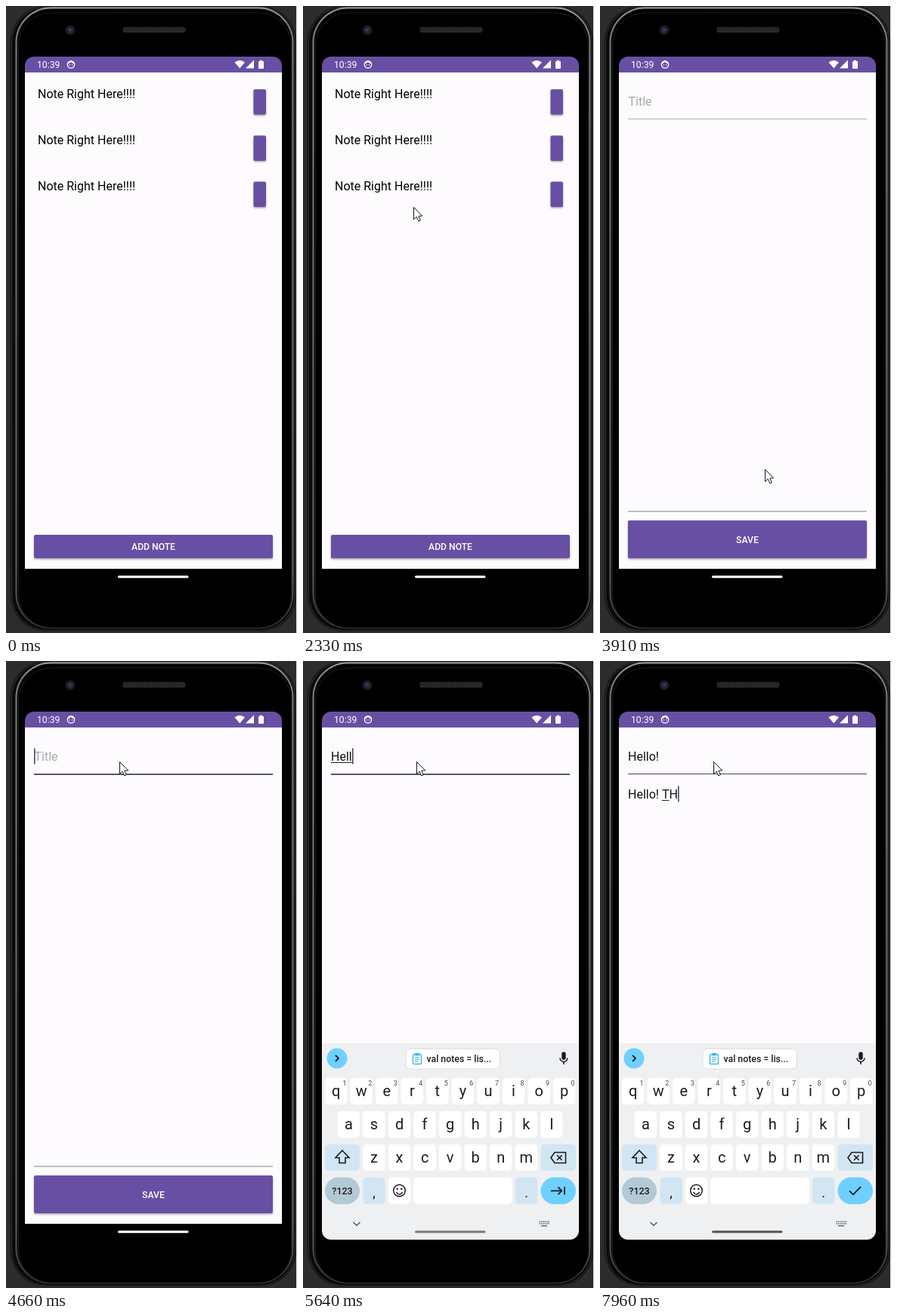
An HTML page with a canvas that plays this animation: 385x830 px, repeating every 8000 ms.

```html
<!DOCTYPE html>
<html lang="en">
<head>
<meta charset="utf-8">
<title>Note app</title>
<style>
html, body { margin: 0; width: 100%; height: 100%; overflow: hidden; background: #2c2c2f; }
canvas { display: block; }
</style>
</head>
<body>
<canvas id="stage" width="385" height="830"></canvas>
<script>
const c = document.getElementById('stage').getContext('2d');
const LOOP = 8000, STEP = 120;
const LIST_PRESS = 3540, EDIT = 3660, FOCUS = 4660, KEYS = 4780, NEXT_FIELD = 6120;
const PURPLE = '#6750a3', PAPER = '#fefbfe', INK = '#1b1c1f', SKY = '#6fd0ff', PALE = '#d2e5f3', BLUE = '#42b6e6';
const FONT = 'Roboto, sans-serif';
const BODY = '16px ' + FONT;

// Pointer legs: arrival time, number of steps, destination, sideways bend.
const LEGS = [
  [860, 4, 125, 258], [1010, 1, 136, 259], [1430, 2, 131, 146], [1690, 2, 135, 115],
  [2070, 2, 140, 151], [2450, 3, 149, 323], [3100, 4, 182, 639],
  [3250, 1, 204, 698], [3400, 1, 207, 709], [4510, 6, 150, 133, 40]
];

function pointerAt(t) {
  let x = -15, y = 351;
  for (const [end, steps, toX, toY, bend = 0] of LEGS) {
    const done = Math.floor((t - end) / STEP) + steps;
    if (done <= 0) break;
    const p = Math.min(1, done / steps);
    x += (toX - x) * p + bend * Math.sin(Math.PI * p);
    y += (toY - y) * p;
    if (p < 1) break;
  }
  return [Math.round(x), Math.round(y)];
}

const typed = (s, start, pace, t) => s.slice(0, Math.max(0, Math.floor((t - start) / pace) + 1));
const keyboardOffset = t => Math.round(70 * 0.057 ** Math.floor((t - KEYS) / STEP));
const handleShade = t => Math.round(95 + 160 * Math.exp(-Math.max(0, t - 4900) / 500));

function box(x, y, w, h, r, fill) {
  c.beginPath();
  c.roundRect(x, y, w, h, r);
  if (fill) { c.fillStyle = fill; c.fill(); }
}

function stroke(color, width) {
  c.strokeStyle = color;
  c.lineWidth = width;
  c.stroke();
}

function outline(x, y, w, h, r, color, width) {
  box(x, y, w, h, r);
  stroke(color, width);
}

function rect(x, y, w, h, fill) {
  c.fillStyle = fill;
  c.fillRect(x, y, w, h);
}

function text(s, x, y, font, fill, align = 'left') {
  c.font = font;
  c.fillStyle = fill;
  c.textAlign = align;
  c.fillText(s, x, y);
}

function path(points, close) {
  c.beginPath();
  points.forEach(([x, y]) => c.lineTo(x, y));
  if (close) c.closePath();
}

function line(points, color, width, close) {
  path(points, close);
  stroke(color, width);
}

function shape(points, fill) {
  path(points, true);
  c.fillStyle = fill;
  c.fill();
}

function disc(x, y, r, fill) {
  c.beginPath();
  c.arc(x, y, r, 0, 7);
  c.fillStyle = fill;
  c.fill();
}

function arc(x, y, r, from, to, color, width) {
  c.beginPath();
  c.arc(x, y, r, from, to);
  stroke(color, width);
}

function moved(x, y, draw) {
  c.save();
  c.translate(x, y);
  draw();
  c.restore();
}

function phone() {
  const edge = c.createLinearGradient(0, 0, 0, 830);
  edge.addColorStop(0, '#a2a4a4');
  edge.addColorStop(0.03, '#7c7e7f');
  edge.addColorStop(0.9, '#5f6162');
  edge.addColorStop(1, '#2c2d2e');
  rect(0, 0, 385, 830, '#2c2c2f');
  box(6, 0, 378, 828, 48, '#0a0a0b');
  outline(7.5, 1, 375, 826, 47, '#38393a', 1);
  outline(13.5, 2.5, 366, 821, 46, edge, 2);
  box(16, 5, 362, 818, 44, '#000');
  outline(16.5, 9, 361, 814, 43, '#1c1c1d', 1);
  rect(384, 0, 1, 830, '#e8e8e8');

  disc(85, 32, 6.5, '#1c1a22');
  disc(85, 32, 4, '#28263a');
  disc(85, 31.5, 1.6, '#454260');
  box(154, 27.5, 84, 8, 4, '#1d1d1d');
  for (let i = 0; i < 27; i++)
    for (let j = 0; j < 3; j++) disc(156.5 + i * 3 + (j % 2) * 1.5, 29.3 + j * 2.3, 0.8, '#414141');
}

function statusBar() {
  box(25, 67, 340, 21, [12, 12, 0, 0], PURPLE);
  text('10:39', 41, 82, '12.2px ' + FONT, '#fff');
  moved(86, 77.5, () => {
    arc(0, 0, 4.7, 0, 7, '#fff', 1.3);
    arc(0, 0, 4, Math.PI * 1.1, Math.PI * 1.9, '#fff', 2);
    disc(-1.7, 0.5, 0.8, '#fff');
    disc(1.7, 0.5, 0.8, '#fff');
  });
  c.beginPath();
  c.moveTo(309.3, 82.5);
  c.lineTo(302.5, 74.5);
  c.quadraticCurveTo(309.3, 69.5, 316, 74.5);
  c.fillStyle = '#fff';
  c.fill();
  shape([[317, 82.5], [328, 82.5], [328, 71.5]], '#fff');
  box(334, 73, 7, 10, 1, '#fff');
  rect(336, 71.8, 3, 2, '#fff');
}

function button(x, y, w, h, label, fill = PURPLE) {
  c.save();
  c.shadowColor = 'rgba(0,0,0,.35)';
  c.shadowBlur = 2.5;
  c.shadowOffsetY = 1.4;
  box(x, y, w, h, 2, fill);
  c.restore();
  if (label) text(label, x + w / 2, y + h / 2 + 4.5, '500 12.2px ' + FONT, '#fff', 'center');
}

function listPage(t) {
  for (let i = 0; i < 3; i++) {
    const y = 110.3 + i * 61.1;
    text('Note Right Here!!!!', 42, Math.round(y + 11.9), BODY, '#000');
    button(327.5, y, 16.5, 33.5);
  }
  button(37, 700, 316, 31, 'ADD NOTE', t >= LIST_PRESS ? '#7a66af' : PURPLE);
}

function field(value, composing, focused, baseline) {
  const x = 37;
  text(value, x, baseline, BODY, '#111');
  const edgeOf = n => x + c.measureText(value.slice(0, n)).width;
  if (composing) {
    const [from, to] = composing.map(edgeOf);
    rect(from, baseline + 2, to - from, 1, '#222');
  }
  if (focused) rect(Math.round(edgeOf(value.length)), baseline - 16.5, 1.6, 21, '#4d4560');
}

function editPage(t) {
  const inNote = t >= NEXT_FIELD, inTitle = t >= FOCUS && !inNote;
  const title = typed('Hello!', 5260, 124, t), note = typed('Hello! TH', 6600, 165, t);
  if (!title) text('Title', 37.5, 132, BODY, '#aaa7ab');
  field(title, inTitle && [0, title.length], inTitle, 132);
  rect(37, 149, 316, inTitle ? 2 : 1, inTitle ? '#5b5372' : inNote ? '#4c474f' : '#b3b0b4');

  const wordStart = note.lastIndexOf(' ') + 1;
  field(note, [wordStart, wordStart ? Math.min(8, note.length) : note.length], inNote, 182);
  rect(37, 668.3, 316, 1.6, '#b3b0b4');
  button(37, 681, 316, 50, 'SAVE');
}

function toolbar() {
  disc(45, 526, 13.5, SKY);
  line([[43, 522], [47, 526], [43, 530]], INK, 1.8);
  box(136, 513.5, 124.5, 26.5, 6, '#fff');
  outline(136, 513.5, 124.5, 26.5, 6, '#dcdde1', 1);
  outline(145.5, 521, 11, 12.5, 1, BLUE, 1.4);
  box(148, 519, 6, 3.5, 1, BLUE);
  for (let i = 0; i < 3; i++) rect(148, 524.4 + i * 2.6, i < 2 ? 6 : 4, 1.2, BLUE);
  text('val notes = lis...', 163.5, 531.3, '500 12.3px ' + FONT, INK);
  box(342.3, 517.5, 5.4, 10.5, 2.7, INK);
  arc(345, 525.5, 5, 0, Math.PI, INK, 1.5);
  line([[345, 530.5], [345, 534]], INK, 1.6);
}

function keyRow(letters, first, y) {
  [...letters].forEach((ch, i) => {
    const x = first + i * 33.56;
    box(x - 14.7, y, 29.4, 35, 5, '#fff');
    text(ch, x, y + 24, '20px ' + FONT, INK, 'center');
    if (letters.length === 10) text((i + 1) % 10, x + 11.5, y + 10, '9px ' + FONT, '#45474a', 'center');
  });
}

function enterIcon(done) {
  if (done) {
    line([[330, 701.5], [335, 706.3], [345, 696]], INK, 1.8);
    return;
  }
  line([[328, 701.3], [342, 701.3]], INK, 1.8);
  line([[337.5, 696.5], [342.3, 701.3], [337.5, 706.1]], INK, 1.8);
  line([[346, 696], [346, 706.6]], INK, 1.8);
}

function letterRows() {
  keyRow('qwertyuiop', 43.6, 552);
  keyRow('asdfghjkl', 60.4, 596);
  keyRow('zxcvbnm', 94, 639.7);
  box(29, 639.7, 46, 35, 5, PALE);
  moved(52, 657, () => line([[0, -9], [9, 0.5], [4, 0.5], [4, 7.5], [-4, 7.5], [-4, 0.5], [-9, 0.5]], INK, 1.6, true));
  box(314.5, 639.7, 46.5, 35, 5, PALE);
  moved(338, 657.5, () => {
    line([[-10, 0], [-5, -7], [9.5, -7], [9.5, 7], [-5, 7]], INK, 1.6, true);
    line([[-2, -3.3], [4.6, 3.3]], INK, 1.6);
    line([[4.6, -3.3], [-2, 3.3]], INK, 1.6);
  });
}

function bottomRow(t) {
  const key = (x, w, r, fill) => box(x, 683.5, w, 35.5, r, fill);
  key(29, 46, 17.7, '#b3c9d6');
  text('?123', 52, 706, '500 12.5px ' + FONT, INK, 'center');
  key(79.3, 29.4, 5, PALE);
  text(',', 94, 709.5, '18px ' + FONT, INK, 'center');
  key(112.8, 29.4, 5, '#fff');
  moved(127.5, 701, () => {
    arc(0, 0, 7.8, 0, 7, INK, 1.5);
    arc(0, 1, 4, 0.25, Math.PI - 0.25, INK, 1.5);
    disc(-2.8, -2.3, 1.2, INK);
    disc(2.8, -2.3, 1.2, INK);
  });
  key(146.3, 130.5, 5, '#fff');
  key(280.8, 29.4, 5, PALE);
  text('.', 295.5, 709.5, '18px ' + FONT, INK, 'center');
  key(314.5, 46.5, 17.7, SKY);
  enterIcon(t >= NEXT_FIELD + STEP);
}

function keyboard(t) {
  c.save();
  box(25, 67, 340, 699, 12);
  c.clip();
  c.translate(0, keyboardOffset(t));
  rect(25, 506, 340, 270, '#eff0f2');
  toolbar();
  letterRows();
  bottomRow(t);
  line([[66.5, 743], [71, 747.3], [75.5, 743]], '#55575a', 1.4);
  for (let i = 0; i < 12; i++)
    rect(312.5 + (i % 6) * 2.4, 741.5 + Math.floor(i / 6) * 2.6, 1.5, 1.5, '#66686b');
  rect(315, 747, 8, 1.4, '#66686b');
  c.restore();
}

function pointer(x, y) {
  moved(x + 0.5, y + 0.5, () => {
    const arrow = [[0, 0], [0, 16], [3.7, 12.6], [6.3, 18.4], [8.8, 17.3], [6.3, 11.7], [11.2, 11.4]];
    shape(arrow, '#fff');
    line(arrow, '#15131a', 1, true);
  });
}

function draw(t) {
  phone();
  statusBar();
  rect(25, 88, 340, 657, PAPER);
  (t < EDIT ? listPage : editPage)(t);
  if (t >= KEYS) keyboard(t);
  const shade = handleShade(t);
  box(148, 754, 93.5, 3.2, 1.6, `rgb(${shade},${shade},${shade})`);
  if (t >= 500) pointer(...pointerAt(t));
}

function tick() {
  draw(performance.now() % LOOP);
  requestAnimationFrame(tick);
}
tick();
</script>
</body>
</html>
```
